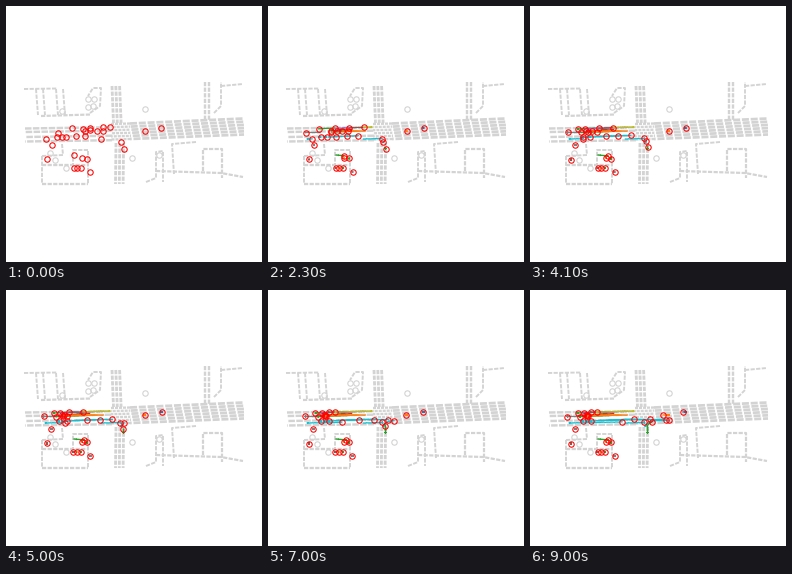
A matplotlib script for the animation above (9.1 s loop, 256x256 px).

```python
import matplotlib.pyplot as plt
import numpy as np
from matplotlib.animation import FuncAnimation

SIZE, DPI = 256, 100
FRAMES, STEP = 91, 100
PX = 72 / DPI
GREY = "lightgray"
T = np.arange(FRAMES) * STEP / 1000
rng = np.random.default_rng(4)

fig = plt.figure(figsize=(SIZE / DPI, SIZE / DPI), dpi=DPI, facecolor="white")
ax = fig.add_axes([0, 0, 1, 1])
ax.set(xlim=(0, SIZE), ylim=(SIZE, 0))
ax.axis("off")


def dashed(*pts, width=1.9, on=4.2, off=1.4, shift=0):
    x, y = zip(*pts)
    ax.plot(x, y, color=GREY, lw=width * PX, dash_capstyle="butt", zorder=1,
            ls=(shift, (on / width, off / width)))


def rings(pts, color, z, width):
    x, y = zip(*pts)
    return ax.plot(x, y, "o", ms=5.4 * PX, mfc="none", mec=color,
                   mew=width * PX, zorder=z)[0]


def draw_roads():
    # west arm
    for i, y in enumerate((122.5, 126, 131, 135.5)):
        dashed((19, y), (106, y - 1.3), width=2.4, on=6.5, shift=3 * i)
    # junction and east arm, fanning apart to the right
    for i in range(6):
        y = 118 + 3.1 * i
        dashed((105, y), (124, y - 0.5), width=2.3, on=3, off=1, shift=i)
        dashed((124, y - 0.5), (238, 112.5 + 3.2 * i), width=2.7,
               on=7, off=1.8, shift=3 * i)
    # crossing street
    for i in range(3):
        dashed((106 + 3.8 * i, 80), (107.5 + 3.8 * i, 117), width=2.8, shift=2 * i)
        dashed((110 + 3.8 * i, 137), (109.5 + 3.8 * i, 178), width=2.8, shift=2 * i)
    for x in (199, 203):
        dashed((x, 76), (x, 114), width=2.4)


def draw_blocks():
    # upper left
    dashed((18, 83), (51, 82.5))
    for x in (30, 37, 50, 57):
        dashed((x, 83), (x + 2, 109))
    dashed((35, 110), (85, 108.5), width=2.2)
    dashed((84, 107), (94, 100), (95, 82), (87, 82), (82, 90))
    # lower left
    dashed((36, 150), (36, 178))
    dashed((82, 145), (82, 178))
    for y in (159, 178):
        dashed((36, y), (82, y), width=2.3)
    dashed((36, 150), (57, 149), (56, 138))
    dashed((82, 144), (67, 144), (67, 158))
    # upper right
    dashed((208, 107), (215, 100), (215, 76))
    dashed((215, 80), (237, 78))
    # lower right
    dashed((140, 176), (150, 172), (150, 146), (157, 145), (157, 176))
    dashed((190, 136), (166, 138), (168, 168))
    dashed((150, 165), (215, 167), (237, 171), width=2.2)
    dashed((197, 165), (197, 143), (216, 143), (216, 172), width=2.2)
    rings([(56, 104.5), (82, 93), (88, 93), (82, 101), (87, 100), (138.5, 102.5),
           (126, 151.5), (44, 147), (48.5, 153.5), (60, 162), (153, 149)],
          GREY, 2, 1.1)


def brake(start, stop, speed=7, delay=0):
    """Cruise at constant speed and come softly to rest at the stop."""
    (x0, y0), (x1, y1) = start, stop
    dist = abs(x0 - x1)
    gap = dist - speed * np.maximum(T - delay, 0)
    left = np.minimum((gap + np.sqrt(gap ** 2 + 4)) / 2, dist) / dist
    return x1 + (x0 - x1) * left, y1 + (y0 - y1) * left


def launch(x0, delay, speed, accel):
    t = np.maximum(T - delay, 0)
    return x0 + speed * t + accel * t * t / 2


def westbound():
    for i, (x, delay) in enumerate(((66.5, 0), (83.5, 0), (97.5, 0), (103.5, 1.2))):
        yield brake((x, 122 - 0.3 * i), (47.5 + 6.5 * i, 123 - 0.3 * i), delay=delay)
    yield brake((52, 126.5), (37.5, 126.5), speed=9.6)
    yield brake((79.5, 125.5), (50, 126.5))
    for i, y in enumerate((123.5, 123.5, 125, 125)):
        yield brake((77 + 6.8 * i, y), (56 + 0.7 * i, 125 + i % 2), speed=6.2 + 0.4 * i)


def eastbound():
    x = launch(39.5, 1.1, 3.3, 0.85)
    yield x, 133 - 0.02 * (x - 39.5)
    yield brake((50.5, 131), (53.5, 131), speed=1.6)
    yield brake((55.5, 131), (61, 131), speed=1.6)
    for i in range(3):
        x = launch(60.5 + 9.2 * i, 0, 3 + 0.75 * i, 0.4)
        yield x, 131 - 1.5 * np.clip((x - 60) / 35, 0, 1)
    yield brake((95.5, 133), (114.3, 132.5), speed=9.6)


def turning():
    x = launch(115.5, 3, 0, 1.3)
    yield x, 130.5 + 5.5 * np.exp((115.5 - x) / 3)
    yield (117.5 + 4 * np.clip((T - 7) / 2, 0, 1) ** 1.5,
           launch(142.5, 3.2, -1.8, 0))
    yield launch(138.5, 6.9, 0, -2.5), 125 + 0 * T
    yield launch(155.5, 7.6, 0, -2.5), 122 + 0 * T


def resting():
    yield brake((68, 149), (78, 150), speed=3.5)
    yield brake((46, 139), (44.5, 139), speed=0.7)
    for x, y in ((41, 153.5), (76, 152), (81, 152.5), (84.5, 166)):
        yield x + 0 * T, y + 0 * T
    for i in range(3):
        yield 67.5 + 3.7 * i + 0 * T, 162 + 0 * T


def paint(paths, *names):
    """Pair each path with a colour, cycling through the names."""
    return [("tab:" + names[i % len(names)], p) for i, p in enumerate(paths)]


movers = (
    paint(westbound(), "green", "purple", "brown", "olive", "gray",
          "green", "brown", "red", "orange", "orange")
    + paint(eastbound(), "cyan")
    + paint(turning(), "cyan", "green", "orange", "blue")
    + paint(resting(), "green", "gray", "brown", "olive")
)
paths = np.array([np.column_stack(p) for _, p in movers])
paths += rng.normal(0, 0.1, paths.shape)

draw_roads()
draw_blocks()
trails = [ax.plot([], [], color=c, lw=1.3 * PX, zorder=3)[0] for c, _ in movers]
agents = rings(paths[:, 0], "red", 4, 1.05)


def update(n):
    for line, path in zip(trails, paths):
        line.set_data(*path[:n + 1].T)
    agents.set_data(*paths[:, n].T)
    return [*trails, agents]


anim = FuncAnimation(fig, update, frames=FRAMES, interval=STEP,
                     repeat=True, repeat_delay=0)
plt.show()
```
